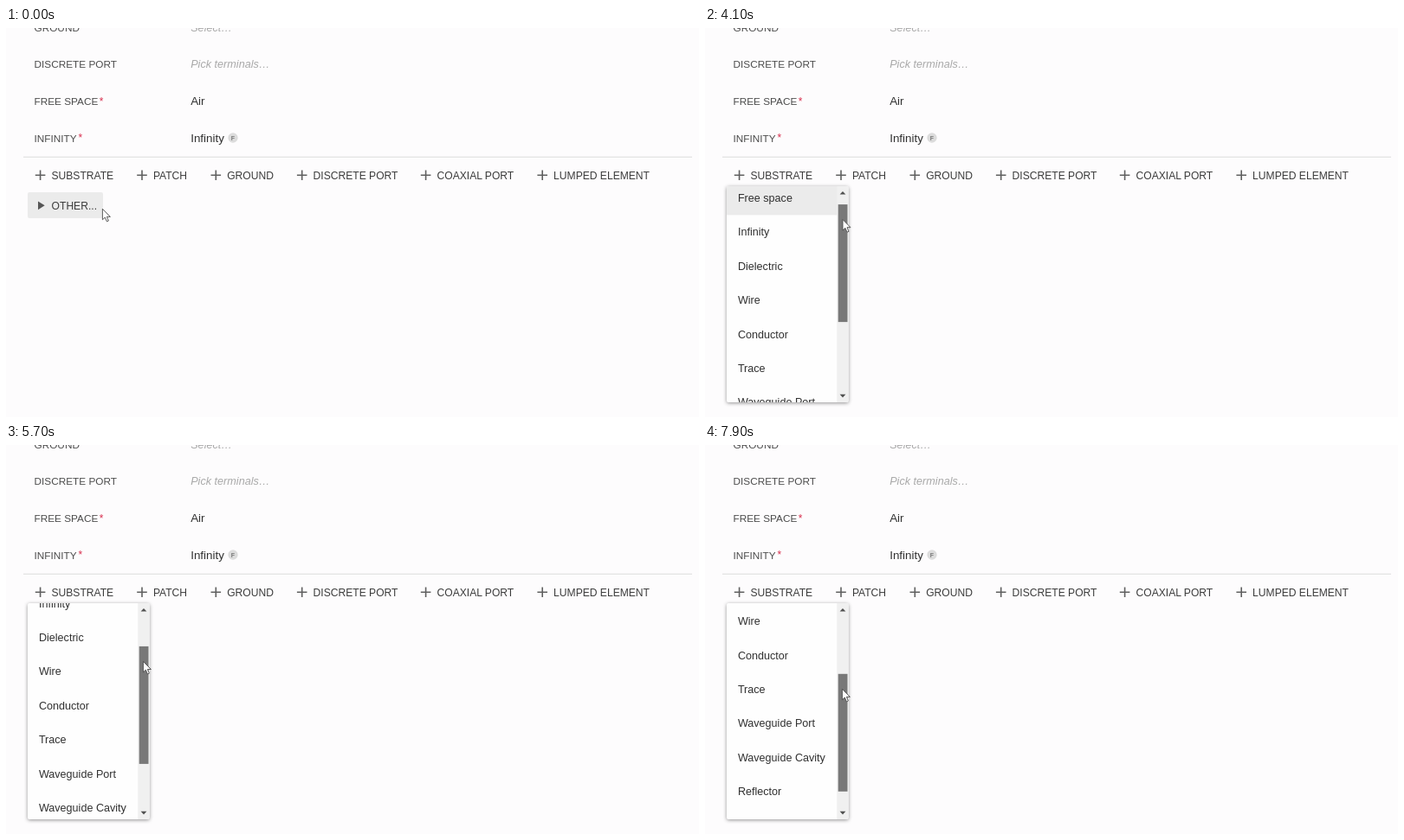
Recreate the animation shown at these times as an HTML page. Size 800 px wide and 450 px high, loop 8 s.

```html
<!DOCTYPE html>
<html lang="en">
<head>
<meta charset="utf-8">
<title>Menu scroll</title>
<style>
html, body { margin: 0; width: 100%; height: 100%; overflow: hidden; background: #fdfcfd; }
svg { display: block; width: 800px; height: 450px; font-family: "Liberation Sans", Arial, sans-serif; }
.label { font-size: 11.8px; fill: #4c4c4c; }
.button { font-size: 12.1px; fill: #3c3c3c; }
.value { font-size: 13.4px; fill: #303030; }
.hint { font-size: 12.65px; font-style: italic; fill: #a9a9a9; }
.star { font-size: 12px; fill: #d8304f; }
.item { font-size: 12.6px; fill: #303030; }
.badge { font-size: 7px; font-weight: bold; fill: #777; text-anchor: middle; }
.plus { stroke: #606060; stroke-width: 1.6; }
.panel { fill: #fefefe; filter: drop-shadow(0 1.4px 2px rgba(0, 0, 0, .42)); }
</style>
</head>
<body>
<svg viewBox="0 0 800 450">
  <defs><clipPath id="inside"><rect x="25" y="183" width="140.7" height="250" rx="2"/></clipPath></defs>
  <rect width="800" height="450" fill="#fdfcfd"/>
  <g id="form"></g>
  <rect x="20" y="148.7" width="772" height="1" fill="#dcdcdc"/>
  <g id="buttons"></g>
  <g id="other">
    <rect x="25" y="190" width="87" height="30" rx="2" fill="#ebebeb"/>
    <path d="M37 200.5L44.7 205.3L37 210.2Z" fill="#555"/>
    <text class="button" x="52.6" y="209.7">OTHER...</text>
  </g>
  <g id="menu">
    <rect class="panel" x="25" y="183" width="140.7" height="250" rx="2"/>
    <g clip-path="url(#inside)">
      <g id="list"><rect x="25" y="190" width="128" height="39.4" fill="#ebebeb"/></g>
      <rect x="152.3" y="183" width="14" height="250" fill="#f0f0f0"/>
      <rect id="thumb" x="153.7" y="197" width="10.8" height="136"/>
      <path id="up" d="M155.6 192.6L159 189L162.4 192.6Z"/>
      <path d="M155.6 423.8L159 427.4L162.4 423.8Z" fill="#505050"/>
    </g>
  </g>
  <path id="cursor" d="M0 0V12.6L2.9 9.9L5 14.7L7 13.8L5 9.2H9Z" fill="#fff" stroke="#4a4a4a" stroke-width=".9" stroke-linejoin="round"/>
</svg>
<script>
const LOOP = 8000, STEP = 100, SCROLL_RATIO = 1.83;
const el = id => document.getElementById(id);

function add(parent, tag, attrs, text = "") {
  const node = document.createElementNS("http://www.w3.org/2000/svg", tag);
  for (const name in attrs) node.setAttribute(name, attrs[name]);
  node.textContent = text;
  parent.append(node);
}
const write = (parent, cls, x, y, text) => add(parent, "text", { class: cls, x, y }, text);

const form = el("form");
const rows = [
  ["GROUND", "Select…", "hint"],
  ["DISCRETE PORT", "Pick terminals…", "hint"],
  ["FREE SPACE", "Air", "value", 107.8],
  ["INFINITY", "Infinity", "value", 83.6]
];
rows.forEach(([label, value, cls, star], i) => {
  const y = 3.7 + 42.6 * i;
  write(form, "label", 32.5, y, label);
  write(form, cls, 213.2, y, value);
  if (star) write(form, "star", star, y - 0.4, "*");
});
add(form, "circle", { cx: 262, cy: 127, r: 5.7, fill: "#dcdcdc" });
write(form, "badge", 262, 129.6, "F");

const actions = [
  [39.6, "SUBSTRATE"], [157, "PATCH"], [242.3, "GROUND"],
  [341.7, "DISCRETE PORT"], [484.6, "COAXIAL PORT"], [619.2, "LUMPED ELEMENT"]
];
for (const [x, text] of actions) {
  add(el("buttons"), "path", { class: "plus", d: `M${x - 5.8} 170.2h11.6M${x} 164.4v11.6` });
  write(el("buttons"), "button", x + 12.9, 174.5, text);
}

["Free space", "Infinity", "Dielectric", "Wire", "Conductor", "Trace",
  "Waveguide Port", "Waveguide Cavity", "Reflector"
].forEach((text, i) => write(el("list"), "item", 37.9, 213.9 + 39.42 * i, text));

// Keys are [time, value] pairs, joined by straight lines.
function along(keys, t) {
  const next = keys.findIndex(key => key[0] > t);
  if (next < 0) return keys[keys.length - 1][1];
  if (next === 0) return keys[0][1];
  const [t0, a] = keys[next - 1], [t1, b] = keys[next];
  return a + (b - a) * (t - t0) / (t1 - t0);
}

const cursorX = [[0, 111.4], [500, 111.4], [600, 112.3], [1400, 112.3], [1900, 152],
  [2100, 152], [2300, 157.8], [2400, 157.8], [2500, 159], [5100, 159], [5700, 158.4]];
const cursorY = [[0, 209.2], [1400, 209.2], [1900, 213], [2100, 213], [2300, 214], [2500, 214.4]];
const drag = [[3500, 0], [4100, 7.1], [5100, 25.1], [5700, 35.9], [6600, 49.8], [7900, 67.8]];

function draw(time) {
  const t = Math.floor(time / STEP) * STEP;
  const moved = along(drag, t);
  const open = along([[500, 0], [600, 0.75], [700, 1]], t);
  const scale = 0.8 + 0.2 * open;

  el("menu").setAttribute("opacity", open);
  el("menu").setAttribute("transform", `translate(25 183) scale(${scale}) translate(-25 -183)`);
  el("other").setAttribute("visibility", open < 1 ? "visible" : "hidden");
  el("list").setAttribute("transform", `translate(0 ${-moved * SCROLL_RATIO})`);
  el("thumb").setAttribute("y", 197 + moved);
  el("thumb").setAttribute("fill", t >= 3100 ? "#787878" : t >= 2200 ? "#a8a8a8" : "#c1c1c1");
  el("up").setAttribute("fill", moved > 0 ? "#505050" : "#a3a3a3");
  el("cursor").setAttribute("transform", `translate(${along(cursorX, t)} ${along(cursorY, t) + moved})`);
}

const start = performance.now();
function tick() {
  draw((performance.now() - start) % LOOP);
  requestAnimationFrame(tick);
}
tick();
</script>
</body>
</html>
```
